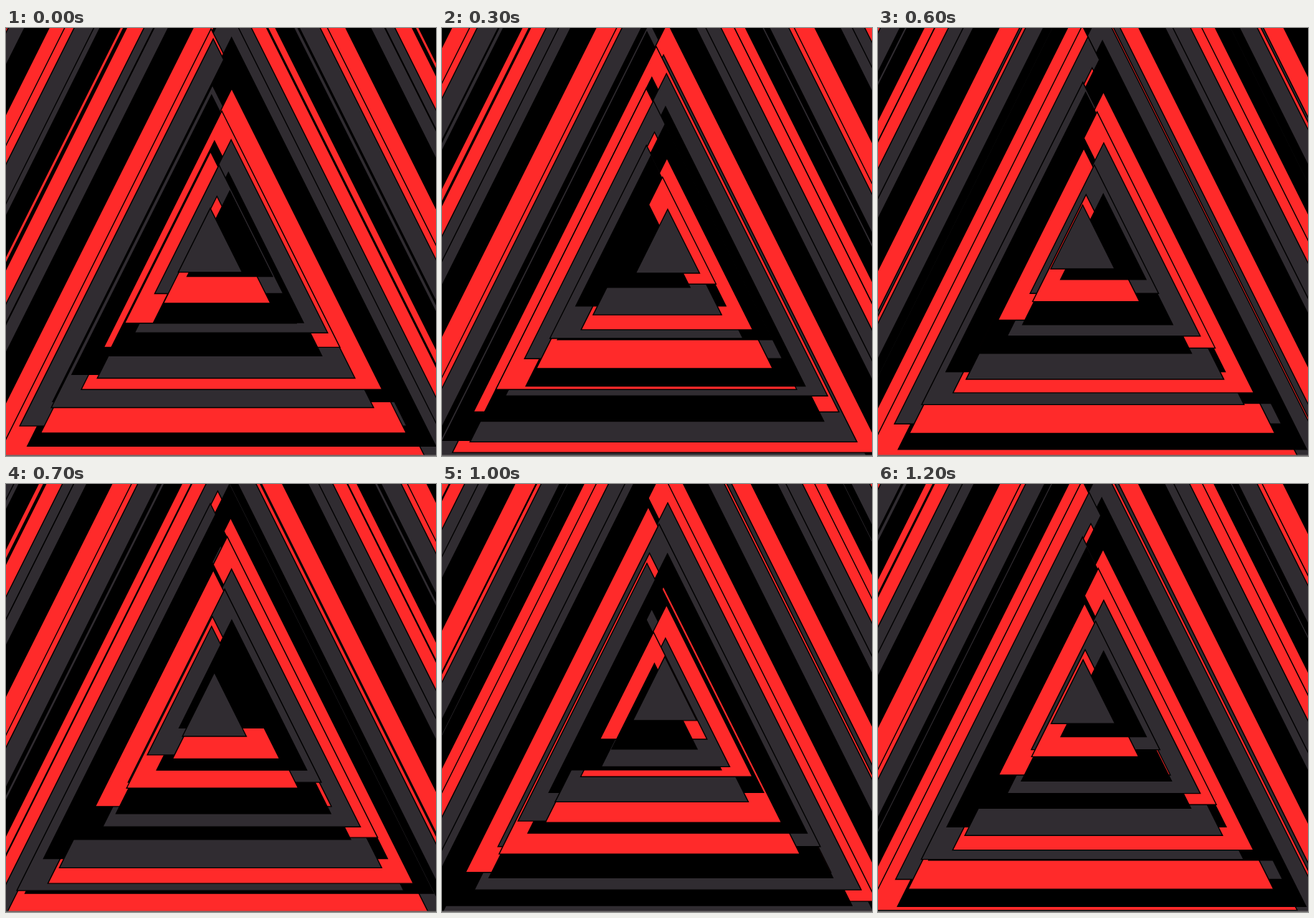
Write an HTML page with a canvas that moves like this. It is 600 px wide and 597 px high and loops after 1300 ms.

```html
<!DOCTYPE html>
<html>
<head>
<meta charset="utf-8">
<title>Nested triangles</title>
<style>
html, body { margin: 0; width: 100%; height: 100%; overflow: hidden; background: #000; }
canvas { display: block; }
</style>
</head>
<body>
<canvas id="stage" width="600" height="597"></canvas>
<script>
const ctx = document.getElementById('stage').getContext('2d');
const COLORS = ['#302c31', '#000', '#ff2a2a'];
const COUNT = 66, ORBIT = 15;
const STEP = 100, LOOP = 1300;
const PASS = 6.12; // steps until the spin starts over
const rad = deg => deg * Math.PI / 180;

// Each triangle's centre circles the middle, out of phase with its neighbours.
function triangle(i, turn) {
  const angle = rad(178 + 147.05 * i - 57 * turn);
  const half = (89.2 + 30.05 * i) / 2;
  const x = 300 + ORBIT * Math.cos(angle);
  const y = 295.5 + ORBIT * Math.sin(angle);
  ctx.beginPath();
  ctx.moveTo(x, y - half);
  ctx.lineTo(x + half, y + half);
  ctx.lineTo(x - half, y + half);
  ctx.closePath();
  ctx.fillStyle = COLORS[i % 3];
  ctx.fill();
  ctx.stroke();
}

function draw(now) {
  const turn = Math.floor((now % LOOP) / STEP) % PASS;
  ctx.fillStyle = '#000';
  ctx.fillRect(0, 0, 600, 597);
  ctx.strokeStyle = '#000';
  ctx.lineWidth = 1.4;
  for (let i = COUNT; i >= 0; i--) triangle(i, turn);
  // Grey rule along the bottom edge
  ctx.fillStyle = '#6c6a6a';
  ctx.fillRect(0, 595.5, 600, 1.5);
}

let start;
function tick(now) {
  start ??= now;
  draw(now - start);
  requestAnimationFrame(tick);
}
draw(0);
requestAnimationFrame(tick);
</script>
</body>
</html>
```
